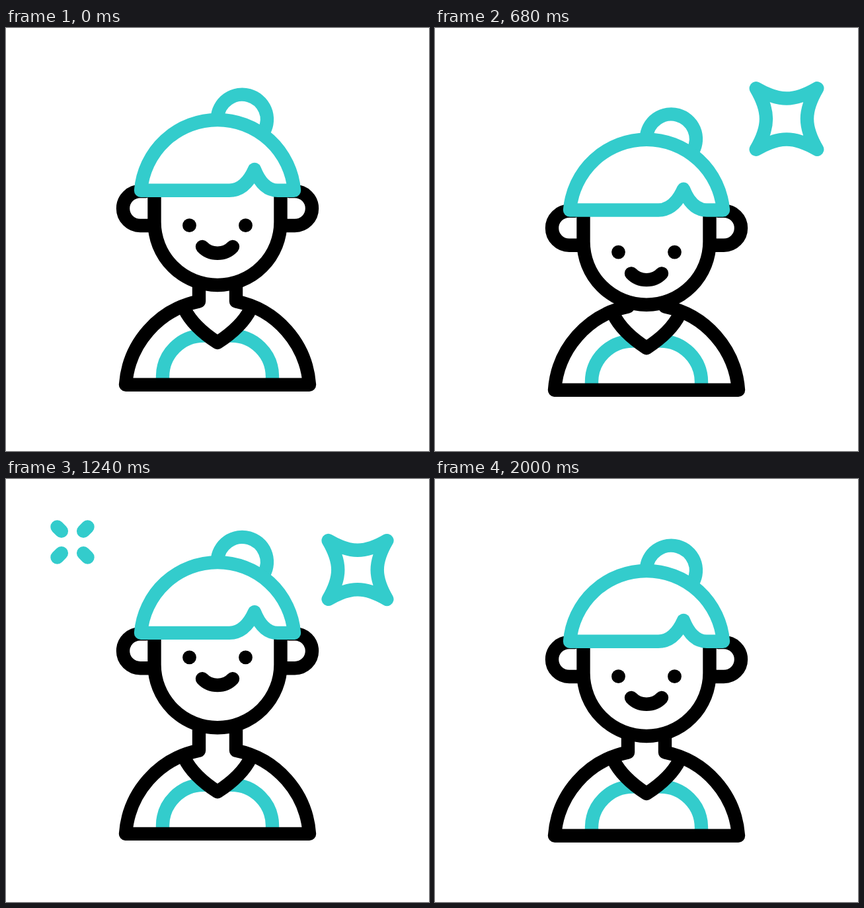
These frames come from a looping animation (640 by 640 pixels, 2.2 s). An HTML page:

```html
<!DOCTYPE html>
<html lang="en">
<head>
<meta charset="utf-8">
<title>Bouncing girl</title>
<style>
  html, body { margin: 0; width: 100%; height: 100%; overflow: hidden; background: #fff; }
  svg { display: block; width: 100%; height: 100%; }
  path { fill: none; stroke-width: 20.4; stroke-linejoin: round; stroke-linecap: round; }
  .ink { stroke: #000; }
  .teal { stroke: #33cccc; }
  .flat { stroke-linecap: butt; }
  .white { fill: #fff; }
</style>
</head>
<body>
<svg viewBox="0 0 640 640">
  <g id="body">
    <path class="teal flat" d="M237 532V527A62 62 0 0 1 299 465.5H341A62 62 0 0 1 403 527V532"/>
    <path class="ink white" d="M270 425Q283 452 320 476Q357 452 370 425"/>
    <path class="ink" d="M292 345V413.5A139 139 0 0 0 181 539.7H459A139 139 0 0 0 348 413.5V345"/>
  </g>
  <g id="head">
    <path class="ink" d="M224 299H203A26 26 0 0 1 203 247H212M416 299H437A26 26 0 0 0 437 247H428"/>
    <path class="ink white" d="M224.5 250V293.5A95.5 95.5 0 0 0 415.5 293.5V250"/>
    <path class="teal" d="M319.8 136A37.6 37.6 0 1 1 390.5 156"/>
    <path class="teal white" d="M204 245.7A116.4 116.4 0 0 1 436 245.7H411C395 245.7 384 234 376 214C367 234 355 245.7 338 245.7Z"/>
  </g>
  <g id="face">
    <circle cx="277.5" cy="298.7" r="10.4"/>
    <circle cx="362.5" cy="298.7" r="10.4"/>
    <path class="ink" d="M297 331C309 344 331 344 343 331"/>
  </g>
  <path id="star" class="teal" transform="translate(532 137.5)"/>
  <path id="burst" class="teal" transform="translate(100.5 95.5)"/>
</svg>
<script>
const LOOP = 2200, STEP = 40;
const el = id => document.getElementById(id);
const span = (t, a, b) => Math.min(1, Math.max(0, (t - a) / (b - a)));
const ease = (t, a, b) => (1 - Math.cos(Math.PI * span(t, a, b))) / 2;

// Dip, jump, dip again, come to rest; a lag makes a part trail behind the body.
function bounce(t, lag, dip, jump) {
  const s = t - lag;
  return dip * ease(t, 200, 580 + lag)
    - (dip + jump) * (ease(s, 580, 1010) - ease(s, 1010, 1410))
    - dip * ease(s, 1410, 1820);
}

function starPath(t) {
  const pulse = 41 + 7 * Math.cos(2 * Math.PI * (t - 1374) / 785);
  const s = pulse * (ease(t, 420, 650) - ease(t, 1400, 1610));
  const a = s * 0.25, b = s * 0.56;
  return `M${-s} ${-s}C${-a} ${-b} ${a} ${-b} ${s} ${-s}C${b} ${-a} ${b} ${a} ${s} ${s}`
    + `C${a} ${b} ${-a} ${b} ${-s} ${s}C${-b} ${a} ${-b} ${-a} ${-s} ${-s}Z`;
}

// Four dashes fly out, swing back a little and shrink away from the middle.
function burstPath(t) {
  if (t <= 700 || t >= 1480) return "";
  const outer = 29.5 * Math.sin(span(t, 700, 980) * Math.PI / 2) - 6.5 * ease(t, 980, 1080);
  const inner = Math.max(0, outer - 8.5 * (1 - span(t, 1000, 1480) ** 2));
  let d = "";
  for (const x of [-1, 1])
    for (const y of [-1, 1]) d += `M${x * inner} ${y * inner}L${x * outer} ${y * outer}`;
  return d;
}

function draw(t) {
  const drop = (id, y) => el(id).setAttribute("transform", `translate(0 ${y})`);
  drop("body", bounce(t, 0, 13.5, 29));
  drop("head", bounce(t, 45, 33, 49));
  drop("face", bounce(t, 78, 41, 61));
  el("star").setAttribute("d", starPath(t));
  el("star").setAttribute("opacity", span(t, 480, 640) - span(t, 1420, 1580));
  el("burst").setAttribute("d", burstPath(t));
}

const start = performance.now();
function tick() {
  const t = (performance.now() - start) % LOOP;
  draw(Math.floor(t / STEP) * STEP);
  requestAnimationFrame(tick);
}
tick();
</script>
</body>
</html>
```
